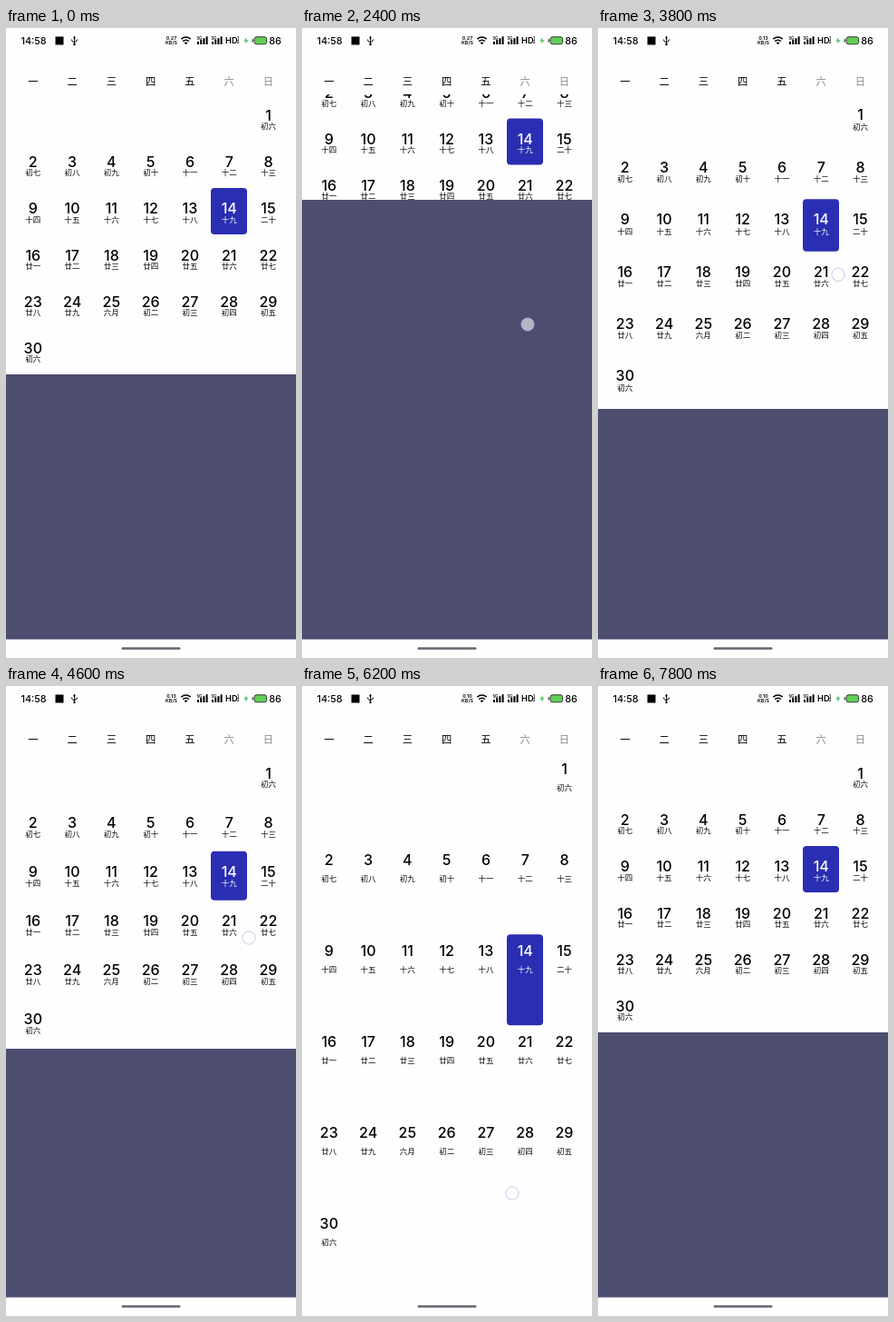
These frames come from a looping animation (320 by 693 pixels, 8000 ms). An HTML page:

```html
<!DOCTYPE html>
<html lang="zh-CN">
<head>
<meta charset="utf-8">
<title>Calendar sheet</title>
<style>
  html, body { margin: 0; width: 100%; height: 100%; overflow: hidden; background: #fefefe; }
  svg { display: block; width: 100%; height: 100%; }
  text { font-family: Inter, Roboto, sans-serif; text-anchor: middle; }
  .cjk { font-family: "Noto Sans CJK SC", "Noto Sans CJK", sans-serif; }
  .day { font-size: 16px; font-weight: 500; }
  .lunar { font-size: 8.5px; }
  .head { font-size: 11.3px; }
  .status { font-size: 10.8px; font-weight: 500; }
  .network { font-size: 9.2px; font-weight: 600; }
  .tiny { font-size: 5.4px; font-weight: 600; }
  .micro { font-size: 4.4px; font-weight: 600; }
</style>
</head>
<body>
<svg viewBox="0 0 320 693">
  <defs><clipPath id="body"><rect y="73" width="320" height="599.5"/></clipPath></defs>
  <rect width="320" height="693" fill="#fefefe"/>
  <g clip-path="url(#body)">
    <g id="grid"></g>
    <rect id="sheet" width="320" height="700" fill="#4d4d70" shape-rendering="crispEdges"/>
  </g>
  <g id="heads"></g>

  <g id="statusBar">
    <text class="status" x="30.5" y="18">14:58</text>
    <rect x="54.5" y="9.5" width="9" height="9"/>
    <g fill="none" stroke="#000">
      <path d="M75.5 10V18M72.7 12.5V14.2L75.5 16.2M78.3 12.5V14L75.5 15.8"/>
      <path d="M193.3 12.2Q198.5 8 203.7 12.2M195.2 14.6Q198.5 11.9 201.8 14.6" stroke-width="1.5"/>
    </g>
    <path d="M74 11.2L75.5 8.6L77 11.2ZM196.6 16.1Q198.5 14.7 200.4 16.1L198.5 18.2Z"/>
    <circle cx="75.5" cy="18" r="1.2"/>
    <text class="tiny" id="speed" x="182.5" y="13.2"></text>
    <text class="tiny" x="182.5" y="18.3">KB/S</text>
    <g id="signals"></g>
    <text class="network" x="248.8" y="17.3">HD</text>
    <text class="micro" x="256" y="13">1</text>
    <text class="micro" x="256" y="17.4">2</text>
    <path d="M266 9.8L262.3 14.6H264.8L263.8 18L267.6 13.2H265.1Z" fill="#4cc25a"/>
    <rect x="274" y="9.8" width="13.6" height="8" rx="2.4" fill="#62cf55" stroke="#333"/>
    <path d="M272.2 12.2V15.4" stroke="#333" stroke-width="1.2"/>
    <text class="status" x="297" y="18">86</text>
  </g>

  <rect x="127.5" y="681.3" width="65" height="2.4" rx="1.2" fill="#666570"/>
  <circle id="touch" r="7.1" fill="#fff" fill-opacity=".59" stroke="#b4b4ea" stroke-opacity=".75"/>
</svg>
<script>
const LOOP = 8000, STEP = 100;
const TOP = 73.5, ROW = 51.2, GAP = 1, MONTH = TOP + 6 * ROW, WEEK = TOP + ROW, FULL = 674;
const byId = id => document.getElementById(id);

function add(parent, tag, attrs, text = "") {
  const node = document.createElementNS("http://www.w3.org/2000/svg", tag);
  for (const key in attrs) node.setAttribute(key, attrs[key]);
  node.textContent = text;
  parent.append(node);
  return node;
}

const columnX = c => 29.8 + 43.28 * c;

function lunarName(day) {
  const n = day < 25 ? day + 5 : day - 24;
  if (day === 25) return "六月";
  if (n === 10) return "初十";
  if (n === 20) return "二十";
  return "初十廿"[Math.floor(n / 10)] + "一二三四五六七八九"[n % 10 - 1];
}

[..."一二三四五六日"].forEach((name, c) =>
  add(byId("heads"), "text", { class: "cjk head", x: columnX(c), y: 63.4, fill: c > 4 ? "#8a8a8a" : "#000" }, name));

for (const x of [211, 227]) {
  for (let i = 0; i < 4; i++) {
    const h = 3 + 1.9 * i;
    add(byId("signals"), "rect", { x: x + 3.2 * i, y: 18 - h, width: 2, height: h });
  }
  add(byId("signals"), "text", { class: "micro", x: x + 2.4, y: 12.6 }, "5G");
}

const selected = add(byId("grid"), "rect", { x: 226, width: 40, rx: 4, fill: "#2a2eb2" });
const days = Array.from({ length: 30 }, (_, i) => {
  const day = i + 1, x = columnX((day + 5) % 7), fill = day === 14 ? "#fff" : "#000";
  return {
    row: Math.floor((day + 5) / 7),
    number: add(byId("grid"), "text", { class: "day", x, fill }, day),
    lunar: add(byId("grid"), "text", { class: "cjk lunar", x, fill }, lunarName(day))
  };
});

// Each move: [time, sheet top]; straight between drag points, settling by easing out.
const sheetKeys = [
  [0, MONTH], [800, MONTH], [900, 345], [1000, 240], [1300, WEEK, 1],
  [2300, WEEK], [2400, 189.4], [2500, 262], [2900, MONTH, 1],
  [3400, MONTH], [3500, 388], [3800, 419], [3900, 424], [4000, 420], [4400, MONTH, 1],
  [4500, MONTH], [4600, 399], [4700, 450], [4800, 512], [5300, FULL, 1],
  [6200, FULL], [6500, 625], [6900, FULL, 1],
  [7100, FULL], [7200, 650], [7300, 570], [7800, MONTH, 1], [LOOP, MONTH]
];
// Each touch: start, end, then from and to positions.
const touches = [
  [900, 1000, 243, 350, 246, 245],
  [2400, 2500, 249, 326, 252, 398],
  [3500, 4000, 264, 240, 265.7, 292],
  [4600, 4700, 268, 277, 270, 328],
  [6200, 6500, 232, 558, 235, 510],
  [7200, 7300, 234, 535, 237, 455]
];

function sheetTop(t) {
  const i = sheetKeys.findIndex(key => key[0] > t);
  const [t0, a] = sheetKeys[i - 1], [t1, b, settle] = sheetKeys[i];
  const p = (t - t0) / (t1 - t0);
  return a + (b - a) * (settle ? 1 - (1 - p) ** 2 : p);
}

function render(t) {
  const top = sheetTop(t);
  const row = Math.max(ROW, (top - TOP - GAP) / 6);
  const scroll = Math.max(0, MONTH - top) / (MONTH - WEEK) * 2 * ROW;
  const stretch = Math.max(0, top - MONTH) / (FULL - MONTH);
  const rowY = r => TOP + r * row - scroll;

  byId("sheet").setAttribute("y", top);
  selected.setAttribute("y", rowY(2));
  selected.setAttribute("height", row);
  for (const { row: r, number, lunar } of days) {
    number.setAttribute("y", rowY(r) + 28.5 - 5 * stretch);
    lunar.setAttribute("y", rowY(r) + 37.7 + 4.2 * stretch);
  }
  byId("speed").textContent = t < 2800 ? "0.27" : t < 5800 ? "0.13" : "0.10";

  const touch = touches.find(([start, end]) => t >= start && t <= end);
  byId("touch").style.display = touch ? "" : "none";
  if (touch) {
    const [start, end, x0, y0, x1, y1] = touch, p = (t - start) / (end - start);
    byId("touch").setAttribute("cx", x0 + (x1 - x0) * p);
    byId("touch").setAttribute("cy", y0 + (y1 - y0) * p);
  }
}

function frame() {
  render(Math.floor(performance.now() % LOOP / STEP) * STEP);
  requestAnimationFrame(frame);
}
frame();
</script>
</body>
</html>
```
